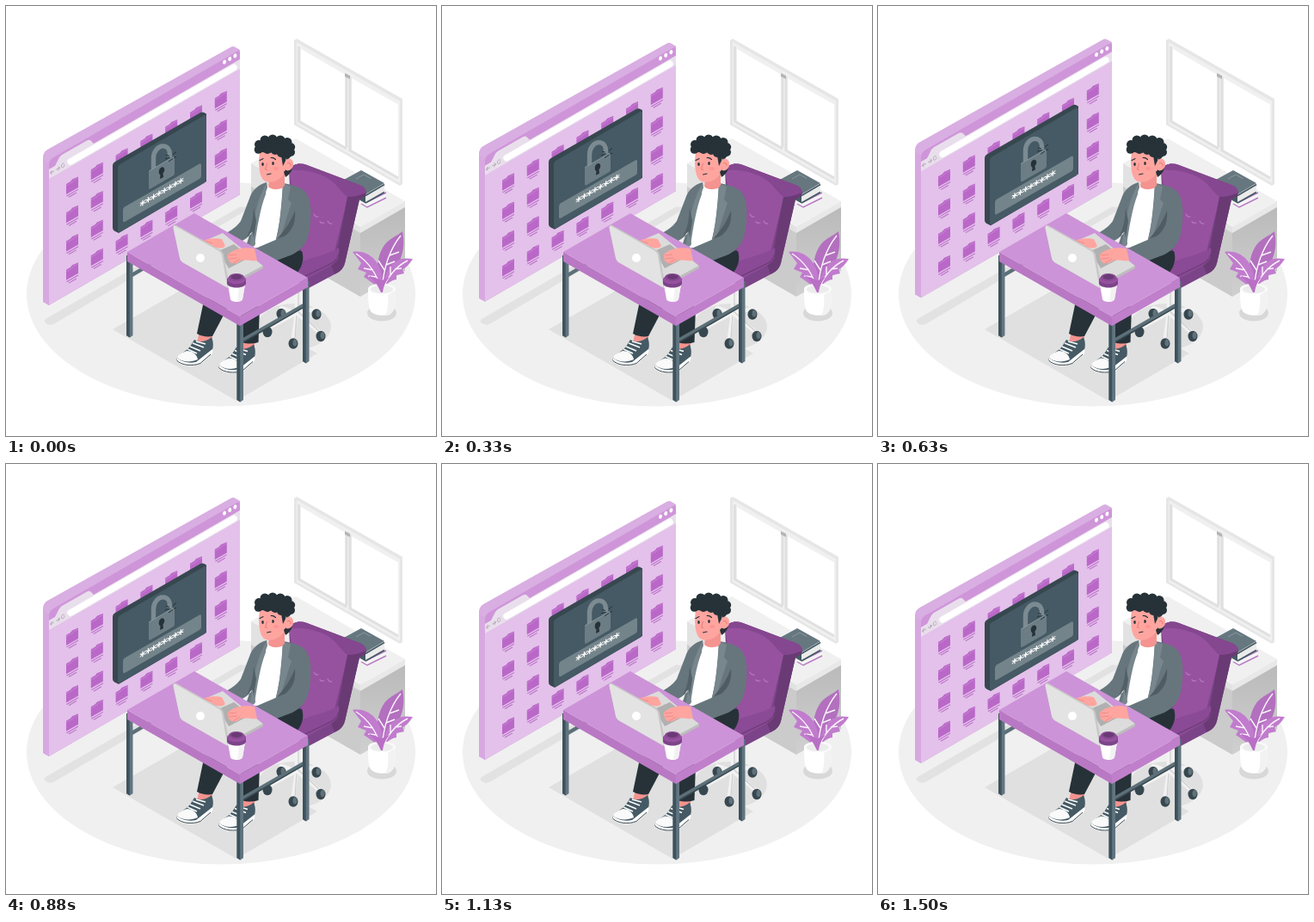
These frames come from a looping animation (500x500 px, 1.54 s). An HTML page:

```html
<!DOCTYPE html>
<html lang="en">
<head>
<meta charset="utf-8">
<title>Password desk scene</title>
<style>
html, body { margin: 0; width: 100%; height: 100%; overflow: hidden; background: #fff; }
svg { display: block; width: 100vw; height: 100vh; }
text { font: bold 14px "DejaVu Sans", sans-serif; letter-spacing: -1px; }
</style>
</head>
<body>
<svg viewBox="0 0 500 500">
  <defs>
    <linearGradient id="side" x1="0" y1="0" x2="0" y2="1">
      <stop offset="0" stop-color="#b9b9b9"/><stop offset="1" stop-color="#d0d0d0"/>
    </linearGradient>
  </defs>
  <g id="floor">
    <ellipse cx="250" cy="335" rx="226" ry="130.500" fill="#f0f0f0"/>
    <path d="M46 364L272 233.500 284 234 277 239 56 369.500Q51 372 46.500 369 43 366.500 46 364Z" fill="#e2e2e2"/>
    <path d="M124 376L218 322 362 404 268 459Z" fill="#e0e0e0"/>
    <ellipse cx="335" cy="373" rx="43" ry="27" fill="#e0e0e0"/>
  </g>

  <g id="pane">
    <path d="M335 40L338 38 461 108 461 207 458 209 335 138Z" fill="#e6e6e6"/>
    <path d="M338 42L458 110.500V206L338 137Z" fill="#f0f0f0"/>
    <path d="M343 50L394 79.500V163L343 134ZM402 84L456 114.500V199L402 168Z" fill="#fff"/>
    <path d="M340.500 47V134L396 166M400 82V168L456 200M396 79V164" fill="none" stroke="#e0e0e0" stroke-width="3"/>
    <path d="M394 78L400 81V85L394 82Z" fill="#b5b5b5"/>
  </g>

  <g id="cabinet">
    <path d="M285 187L412 260V338L285 265Z" fill="#cbcbcb"/>
    <path d="M285 187L320 207V230L285 210Z" fill="#e2e2e2"/>
    <path d="M412 260L464 230V308L412 338Z" fill="url(#side)"/>
    <path d="M285 183L337 154 464 227 412 257Z" fill="#f0f0f0"/>
    <path d="M285 183L412 257V264L285 190Z" fill="#e2e2e2"/>
    <path d="M412 257L464 227V234L412 264Z" fill="#e8e8e8"/>
  </g>

  <g id="books">
    <path d="M413 221L432 211 442 218V223L419 234.500 413 231Z" fill="#f4f4f4"/>
    <path d="M413 224L420 228 442 217M413 230L420 234 442 223" fill="none" stroke="#b878c4" stroke-width="1.400"/>
    <path d="M392 206L418 221V229.500L392 214.500Z" fill="#455a64"/>
    <path d="M418 221L440 208.500V216L418 228.500Z" fill="#ebebeb"/>
    <path d="M391 203L413 191 440 206 418 219Z" fill="#66777f"/>
    <path d="M391 203L418 219V222L391 206Z" fill="#37474f"/>
    <path d="M418 220.500L440 207.500M418 229L440 216.500" stroke="#455a64" stroke-width="1.800"/>
    <path d="M407 201L416 196 424 200.500" fill="none" stroke="#8a979d" stroke-width="1"/>
  </g>

  <g id="plant">
    <ellipse cx="437" cy="357" rx="17" ry="9.500" fill="#d8d8d8"/>
    <path d="M437 331C429 316 430 292 440 278 446 270 454 268 461 262 464 276 462 291 454 303 448 313 441 319 437 331Z" fill="#b370bf"/>
    <path d="M436 331C427 322 423 320 416 315L419 310 409 306 413 299 403 286C414 284 425 289 431 298 438 308 439 321 436 331Z" fill="#c17ccd"/>
    <path d="M438 331C439 315 444 303 453 297 459 293 466 293 473 294 469 300 466 304 461 306L463 311 454 313 454 318C447 319 441 324 438 331Z" fill="#c17ccd"/>
    <path d="M437 330C439 305 446 283 459 267M436 329C431 311 421 297 407 288M438 329C444 315 453 303 467 296M440 307L433 296M446 290L457 286M442 301L452 297M427 307L416 305M431 315L421 314M447 313L447 303M452 306L460 305" fill="none" stroke="#fbf3fc" stroke-width="1.400"/>
    <path d="M421 328C421 340 421 352 425 356 431 361 444 361 449 356 453 351 453 340 453 328Z" fill="#fff"/>
    <path d="M444 336C445 344 444 355 441 360 445 360 448 358 450 355 453 350 453 340 453 330Z" fill="#f2f2f2"/>
    <ellipse cx="437" cy="329" rx="16" ry="6.500" fill="#fafafa"/>
    <ellipse cx="437" cy="329.500" rx="13" ry="4.700" fill="#ececec"/>
    <path d="M436 333C431 322 427 317 420 313L437 319 446 315C441 321 439 326 438 333Z" fill="#b86fc5"/>
  </g>

  <g id="browser">
    <path d="M43 176Q43 170 49 166.700L262 47.500Q264 46.500 266 47.500L272 51V219.500L50 348 43 344Z" fill="#d9aee2"/>
    <path d="M43 178L50 182V348L43 344Z" fill="#d8a9e1"/>
    <path d="M50 184Q50 179 55 176L269 52.500Q272 51 272 54V217Q272 219.500 270 220.700L50 348Z" fill="#e3c1ea"/>
    <path d="M50 184Q50 179 55 176L269 52.500Q272 51 272 54V62L50 190Z" fill="#cf95d9"/>
    <path d="M50 190L57 186 61 178Q62 175 65 173L94 156.500Q97 155 99 157L102 160 272 62V73L50 201Z" fill="#e9dfec"/>
    <path d="M75 181L265 71.500" stroke="#fff" stroke-width="7.500" stroke-linecap="round"/>
    <g fill="none" stroke="#a7a0aa" stroke-width=".8">
      <path d="M51.500 194.500L56 192M53.500 191L51.500 194.500 53.500 195.500M58 190.500L62.500 188M60.500 187L62.500 188 60.500 191.500M68 184C66 181.500 64 185 64.500 187 65.500 189 68 187 68 185"/>
    </g>
    <g id="dots" fill="#fff"></g>
    <g id="folders"></g>
    <g id="dialog">
      <path d="M124 186Q124 182.500 127 181L226 124.200Q228.500 123 230.500 124L233 125.500 233 204 131 264 126 261.500Q124 260 124 258Z" fill="#37474f"/>
      <path d="M130 188Q130 185.500 132.500 184L230 127.500Q233 126 233 128.500V201Q233 204 230.500 205.800L133 262.500Q130 264 130 260.500Z" fill="#455a64"/>
      <path d="M136 237.500Q136 235 138 233.500L225 183.500Q227 182.500 227 185V197.500Q227 199.500 225 201L138 251Q136 252 136 249.500Z" fill="#74848b"/>
      <text fill="#fff" transform="matrix(1 -.577 0 1 155.350 238.300)">********</text>
      <g transform="translate(0 -1)">
        <path d="M171.500 194V178C171.500 170 177 164 182.500 164 188 164 190.500 168.500 190.500 173.500V177" fill="none" stroke="#7c8b92" stroke-width="5.400"/>
        <path d="M166 195Q166 193 168 192L194 177Q196 176 196 178V195.500Q196 197.500 194 198.700L168 213.700Q166 214.500 166 212.500Z" fill="#6d7d85"/>
        <path d="M166 193.500L168 192 194 177 196 177.500" fill="none" stroke="#8a999f" stroke-width="1"/>
        <path d="M181 188.500C183.500 188 185 190.500 184 193 183.500 194.500 182.500 195 182.500 196L183 200 179 202 179.500 197.500C177 196 177 190 181 188.500Z" fill="#263238"/>
        <path d="M185 179L190 177M186 174.500L190 175.500M194 174L198 170.500M195 177.500L198 176.500M189 182L194 178.500" stroke="#263238" stroke-width="1"/>
      </g>
    </g>
  </g>

  <g id="chair">
    <g fill="none" stroke="#f2f2f2" stroke-width="4.500" stroke-linecap="round">
      <path d="M338 325V357L306 374M338 357L320 351M338 357L334 386M338 357L364 379M338 357L361 352"/>
    </g>
    <path d="M340 328V356L364 378M338 360L336 386" fill="none" stroke="#cfcfcf" stroke-width="1.300"/>
    <g fill="#37474f">
      <ellipse cx="320" cy="358" rx="5.500" ry="6.200"/><ellipse cx="334" cy="392.500" rx="5.500" ry="6.200"/>
      <ellipse cx="366" cy="384" rx="5.500" ry="6.200"/><ellipse cx="361" cy="358.500" rx="5.500" ry="6.200"/>
      <ellipse cx="304" cy="379" rx="5.500" ry="6.200"/>
    </g>
    <g fill="#607179">
      <ellipse cx="322" cy="357" rx="2.500" ry="4"/><ellipse cx="336" cy="391.500" rx="2.500" ry="4"/>
      <ellipse cx="368" cy="383" rx="2.500" ry="4"/><ellipse cx="363" cy="357.500" rx="2.500" ry="4"/>
    </g>
    <path d="M329 190C333 184 341 182 350 185L411 208C417 210 420 215 418.500 219L411 225 394 299C392 306 388 309 382 312L352 328 335 318Z" fill="#7c4488"/>
    <path d="M329 190C333 184 341 182 350 185L405 210 397 224 382 286 345 297Z" fill="#96529f"/>
    <path d="M397 222C404 221 414 218 418.500 217.500 418.500 221 415 223 411 225L394 299C392 306 388 309 382 312L376 296C384 290 386 283 388 270Z" fill="#6a3a75"/>
    <path d="M329 190C333 184 341 182 350 185L411 208C416 210 419 213 418.500 217 412 220 404 222 397 222 388 215 384 205 372 199 356 191 340 189 329 192Z" fill="#85478f"/>
    <path d="M340 299C352 293 370 291 387 281 389 290 386 297 379 301L352 316 340 312Z" fill="#8a4a95"/>
    <path d="M346 315L377 300C384 297 388 290 389 281" fill="none" stroke="#6a3a75" stroke-width="1.200"/>
    <path d="M358 242Q360 246 363 245M365 251Q367 253 370 252M374 250Q376 254 379 253" fill="none" stroke="#b777c1" stroke-width="1.200" stroke-linecap="round"/>
  </g>

  <g id="legs">
    <path d="M275 388L290 388 288 400 276 400ZM225 378L241 380 238 392 222 392Z" fill="#f4938f"/>
    <path d="M272 340L295 350 293.500 391C287 393 281 393 274 391Z" fill="#263238"/>
    <path d="M231 338L258 350 240 384C234 385 227 384 222 381Z" fill="#263238"/>
    <g id="shoe">
      <path d="M219 388C226 392 233 390 239 385 242 392 241 400 238 404L226 416C217 420 203 418 199 412 197 407 208 403 214 396Z" fill="#455a64"/>
      <path d="M199 409C203 413 211 416 221 414L240 399C241 402 240 404 238 406L227 416C217 420 203 419 199 413Z" fill="#fff"/>
      <path d="M199 409C200 405 206 403 210 401 217 401 222 405 223 411 215 415 204 414 199 409Z" fill="#fafafa"/>
      <path d="M211 399L222 404M214 396L226 401M217 392L230 397M221 390L232 393" stroke="#fff" stroke-width="1.400"/>
      <path d="M198.500 412C204 418 217 419 226 415.500L238 405" fill="none" stroke="#37474f" stroke-width="1"/>
    </g>
    <use href="#shoe" x="49" y="8.500"/>
  </g>

  <g id="man">
    <path d="M300 278L344 285C348 296 342 309 334 314L295 305Z" fill="#263238"/>
    <path d="M302 209L326 209 335 250 318 291 282 282 292 235Z" fill="#fff"/>
    <path d="M303 205C293 208 286 214 283 224L273 250C268 258 257 263 250 268L256 280C269 277 283 270 287 262L290 277 284 282 280 276 291 243 304 211Z" fill="#67767d"/>
    <path d="M303 206C297 217 292 228 289 246L283 281 289 279C292 257 296 234 302 219Z" fill="#78868d"/>
    <path d="M288 235C287 248 286 258 280 268L287 262 288 270 291 250Z" fill="#526067"/>
    <path d="M249 269L252.500 266.500 258.500 278.500 254 280.500Z" fill="#37474f"/>
    <path d="M322 206C334 208 346 211 350 219 356 229 355 250 352 264 349 277 341 285 333 289L312 297 309 288C317 268 320 240 322 206Z" fill="#67767d"/>
    <path d="M322 206L331 210 328 225 332 229C326 246 322 263 314 282L310 285C318 260 321 236 322 206Z" fill="#78868d"/>
    <path d="M336 238C337 251 334 259 325 267L290 282 295 297C313 296 334 291 344 281 353 272 355 252 353 238Z" fill="#67767d"/>
    <path d="M336 238C337 251 334 259 325 267L315 271C324 261 331 251 336 238Z" fill="#4f5c62"/>
    <path d="M288 282L291.500 281 296 296.500 291 297.500Z" fill="#526067"/>
    <path d="M307 196L324 191 324 208C322 214 310 215 305 210Z" fill="#f4938f"/>
    <path d="M295 170C293 182 294 198 300 203 306 207 317 204 323 196L326 190 322 164 299 162Z" fill="#ffa5a0"/>
    <g fill="#263238">
      <path d="M293 167C301 152 325 151 333 164L332 174 326 181C326 177 324 173 321 171L295 170Z"/>
      <circle cx="294" cy="161" r="5"/><circle cx="301" cy="156" r="5.500"/><circle cx="310" cy="155" r="5.500"/>
      <circle cx="319" cy="156" r="5.500"/><circle cx="327" cy="158.500" r="5.500"/><circle cx="331.500" cy="164" r="4.700"/>
      <circle cx="331" cy="170" r="5"/><circle cx="293.500" cy="167" r="4.800"/><circle cx="304" cy="167" r="5"/>
      <circle cx="313" cy="168" r="5"/><circle cx="320" cy="171" r="5"/>
      <path d="M333 182C334 190 331 195 325 199L323 193Z"/>
    </g>
    <ellipse cx="328.500" cy="184.500" rx="5.600" ry="7" fill="#ffa5a0" transform="rotate(15 328.500 184.500)"/>
    <path d="M320 174L326 173 325 180 322 186Z" fill="#263238"/>
    <ellipse cx="298.500" cy="184" rx="1.300" ry="1.900" fill="#263238"/>
    <ellipse cx="310.500" cy="183" rx="1.300" ry="1.900" fill="#263238"/>
    <path d="M295 179.500L299 177.500M308 176.500Q311 176 313.500 178.500M303.500 196L308 195" fill="none" stroke="#263238" stroke-width="1.100" stroke-linecap="round"/>
    <path d="M303.500 183L301.500 190 304 190.500M327 183Q331 181 331 186" fill="none" stroke="#e77b78" stroke-width="1"/>
    <ellipse cx="314" cy="189" rx="3" ry="2" fill="#ff9693"/>
  </g>

  <g id="desk">
    <path d="M147 310L190 285V290L147 315Z" fill="#5d7079"/>
    <path d="M272 388L348 344.500V349.500L272 393Z" fill="#5d7079"/>
    <path d="M272 392L348 348.500V350L272 394Z" fill="#37474f"/>
    <g id="post"><path d="M140 290H147.500V383L144 385.500 140 383Z" fill="#607580"/><path d="M140 290H143.700V385.500L140 383Z" fill="#3f525b"/></g>
    <use href="#post" x="205" y="30"/>
    <use href="#post" x="128.500" y="75"/>
    <path d="M141 286L272 361V372L141 297Z" fill="#b978c4"/>
    <path d="M272 361L351 316V327L272 372Z" fill="#c07fcb"/>
    <path d="M141 286L219 241 351 316 272 361Z" fill="#cd93d8"/>
  </g>

  <g id="laptop">
    <path d="M224 276L252 266 299 302V305L259 327 250 322Z" fill="#bdbdbd"/>
    <path d="M224 276L252 264 298.500 302 258 324Z" fill="#dcdcdc"/>
    <path d="M247 285L265 277 284 292 259 305Z" fill="#b0b0b0"/>
    <path d="M231 272C238 270 246 270 251 271L255 279C251 284 244 280 238 281 233 280 229 276 231 272Z" fill="#ffa5a0"/>
    <path d="M231 273L240 276M234 278L243 280" stroke="#e98783" stroke-width=".8"/>
    <path d="M258 289C265 282 277 280 289 282L292 296C283 297 276 293 270 298 263 302 257 297 258 289Z" fill="#ffa5a0"/>
    <path d="M259 290L268 289M259 294L269 293M264 299L272 294" stroke="#e98783" stroke-width=".8"/>
    <path d="M194.500 257Q194.500 254 198 255L248 283Q252 285 253 289L260 326Q259 329 256 327L207 299Q203 297 202 293Z" fill="#c8c8c8"/>
    <path d="M194.500 258Q194.500 255 197 256L247 284.500Q250 286 251 290L257.500 327.500 207 299Q203 297 202 293Z" fill="#e3e3e3"/>
    <circle cx="226" cy="293" r="5" fill="#fff"/>
  </g>

  <g id="cup">
    <path d="M258 324H278L275 341C274 345 262 345 261 341Z" fill="#fff"/>
    <path d="M271 326L278 323 275 341C274 343 271 344 269 344Z" fill="#f2f2f2"/>
    <path d="M257 317L279 317V323C277 329 259 329 257 323Z" fill="#7d4489"/>
    <ellipse cx="268" cy="318" rx="11" ry="5.200" fill="#96529f"/>
    <ellipse cx="268" cy="315.500" rx="9" ry="4.500" fill="#8a4a95"/>
    <ellipse cx="268" cy="315" rx="6.500" ry="3" fill="#6a3a75"/>
  </g>
</svg>
<script>
const LOOP = 1540, RISE = 9, PEAK = 725, SLOPE = 0.577;
const $ = id => document.getElementById(id);
const browser = $("browser");

const folder = (x, y) => `<g transform="translate(${x} ${y})">
  <path d="M-7 -3L-2 -6 0 -8.500 7 -11.500V1L-7 9Z" fill="#ba68c8"/>
  <path d="M-7 -1L0 -5 1.500 -7 7 -10" fill="none" stroke="#c987d4" stroke-width=".8"/>
  <path d="M-6.500 11L7 3.200M-4 12.300L5 7.100" stroke="#bd72ca" stroke-width="1.100"/></g>`;

const dot = (x, y) =>
  `<ellipse cx="${x}" cy="${y}" rx="1.900" ry="2.600" transform="rotate(20 ${x} ${y})"/>`;

let icons = "";
for (let col = 0; col < 7; col++)
  for (let row = 0; row < 4; row++) {
    const dx = col * 28.8;
    icons += folder(77 + dx, 210 - dx * SLOPE + row * 33.3);
  }
$("folders").innerHTML = icons;
$("dots").innerHTML = [0, 1, 2].map(i => dot(254 + i * 6.2, 65.2 - i * 3.6)).join("");

function draw(ms) {
  const phase = (ms % LOOP - PEAK) / LOOP;
  const lift = RISE * (1 + Math.cos(2 * Math.PI * phase)) / 2;
  browser.setAttribute("transform", `translate(0 ${-lift})`);
}

const start = performance.now();
function tick() {
  draw(performance.now() - start);
  requestAnimationFrame(tick);
}
tick();
</script>
</body>
</html>
```
